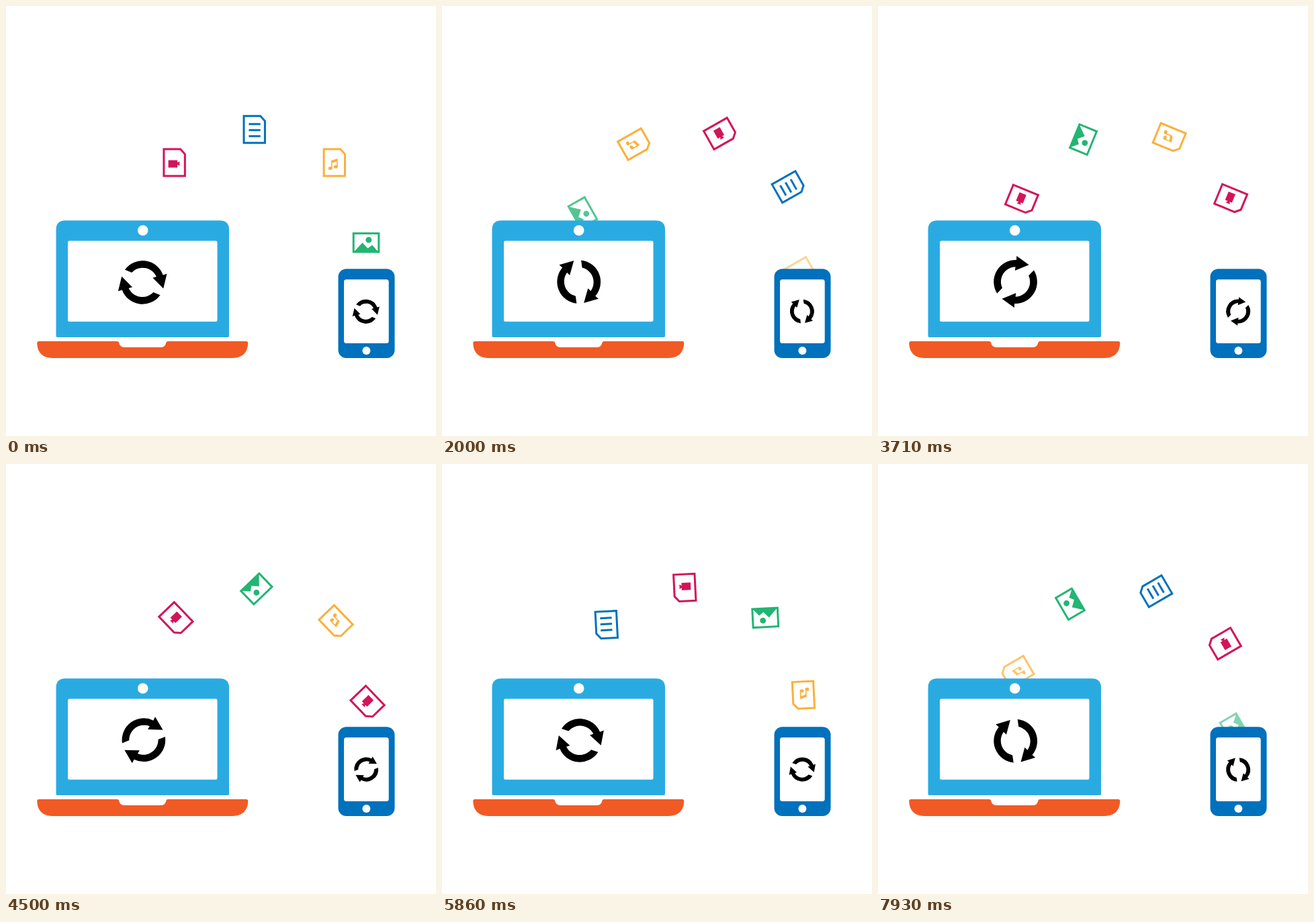
Recreate the animation shown at these times as an HTML page. Size 640 by 640 pixels, loop 8000 ms.

```html
<!DOCTYPE html>
<html lang="en">
<head>
<meta charset="utf-8">
<title>File sync</title>
<style>
  html, body { margin: 0; width: 100%; height: 100%; overflow: hidden; background: #fff; }
  svg { display: block; width: 100%; height: 100%; }
  .line { fill: none; stroke: currentColor; stroke-width: 3; }
  .solid { fill: currentColor; }
</style>
</head>
<body>
<svg viewBox="0 0 640 640">
  <defs>
    <path id="page" class="line" d="M-15.7 -20H9L15.7 -12.5V20H-15.7Z"/>
    <g id="doc" color="#0071bc">
      <use href="#page"/>
      <path class="line" d="M-8.3 -8H9M-8.3 1H9M-8.3 10H9"/>
    </g>
    <g id="video" color="#d4145a">
      <use href="#page"/>
      <path class="solid" d="M-9 -3.7H4.5V0L7.7 -1.8V4.8L4.5 3V7.3H-9Z"/>
    </g>
    <g id="music" color="#fbb03b">
      <use href="#page"/>
      <ellipse class="solid" cx="-6" cy="8.3" rx="3" ry="2.5"/>
      <ellipse class="solid" cx="2" cy="6.2" rx="3" ry="2.5"/>
      <path class="solid" d="M-4.8 8V-3L5 -6V6H3.4V-1.6L-3.2 0.4V8Z"/>
    </g>
    <g id="image" color="#22b573">
      <rect class="line" x="-18.8" y="-13.8" width="37.6" height="27.6"/>
      <path class="solid" d="M-18 13.5L-5.5 0L2.5 8.5L9 3.5L18 13.5Z"/>
      <circle class="solid" cx="3.8" cy="-4" r="4.4"/>
    </g>
    <path id="arrow" d="M-26.3 -18.8A32.4 32.4 0 0 1 30.5 -11L36.3 -13L31 9L15.2 -7L20.6 -8.5A22.2 22.2 0 0 0 -16 -14.6Z"/>
    <g id="sync">
      <use href="#arrow"/>
      <use href="#arrow" transform="rotate(180)"/>
    </g>
  </defs>

  <g id="orbit"></g>

  <path fill="#29abe2" d="M74.5 333Q74.5 319.3 88.5 319.3H318Q332 319.3 332 333V491Q332 493 330 493H76.5Q74.5 493 74.5 491Z"/>
  <rect x="92" y="349.5" width="222.5" height="120.3" rx="2.5" fill="#fff"/>
  <circle cx="203.7" cy="334" r="7.8" fill="#fff"/>
  <path fill="#f15a24" d="M49 499H165Q168 499 168.3 501.5Q169.5 508 176 508H231Q237 508 238.2 501.5Q238.5 499 241 499H357.5Q360.3 499 360.3 502Q359 524 336 524H70Q47.5 524 46.2 502Q46.2 499 49 499Z"/>

  <rect x="494.5" y="391.2" width="84" height="132.8" rx="12" fill="#0071bc"/>
  <rect x="503" y="407" width="66.7" height="95" rx="3.5" fill="#fff"/>
  <circle cx="536.4" cy="513" r="6" fill="#fff"/>

  <g class="spin" data-place="translate(204.2 411.4)"><use href="#sync" x="-1"/></g>
  <g class="spin" data-place="translate(536 454.7) scale(.553)"><use href="#sync" x="-.5"/></g>
</svg>
<script>
const LOOP = 8000, STEPS = 112, DEGREES_PER_STEP = 2.16;
const CENTER = { x: 369.7, y: 352.2 };
const KINDS = ["image", "music", "doc", "video", "music", "image", "video", "doc"];

const orbit = document.getElementById("orbit");
const spinners = document.querySelectorAll(".spin");
const clamp = v => Math.max(0, Math.min(1, v));

const icons = KINDS.map((kind, i) => {
  const node = document.createElementNS("http://www.w3.org/2000/svg", "use");
  node.setAttribute("href", "#" + kind);
  orbit.append(node);
  return { node, start: -45 * i, radius: kind === "image" ? 166.3 : 168.4 };
});

// Icons fade out going into the phone and fade in coming from the laptop.
const opacityAt = angle => angle < 180 ? clamp((26 - angle) / 20) : clamp((angle - 180) / 20);

function draw(ms) {
  const step = Math.floor((ms % LOOP + 5) / (LOOP / STEPS)) % STEPS;
  const turn = step * DEGREES_PER_STEP;
  for (const { node, start, radius } of icons) {
    const angle = (start + turn + 720) % 360;
    const rad = angle * Math.PI / 180;
    const x = CENTER.x + radius * Math.cos(rad);
    const y = CENTER.y + radius * Math.sin(rad);
    node.setAttribute("transform", `translate(${x} ${y}) rotate(${turn})`);
    node.setAttribute("opacity", opacityAt(angle));
  }
  for (const s of spinners) s.setAttribute("transform", `${s.dataset.place} rotate(${turn})`);
}

const begin = performance.now();
function tick() {
  draw(performance.now() - begin);
  requestAnimationFrame(tick);
}
tick();
</script>
</body>
</html>
```
